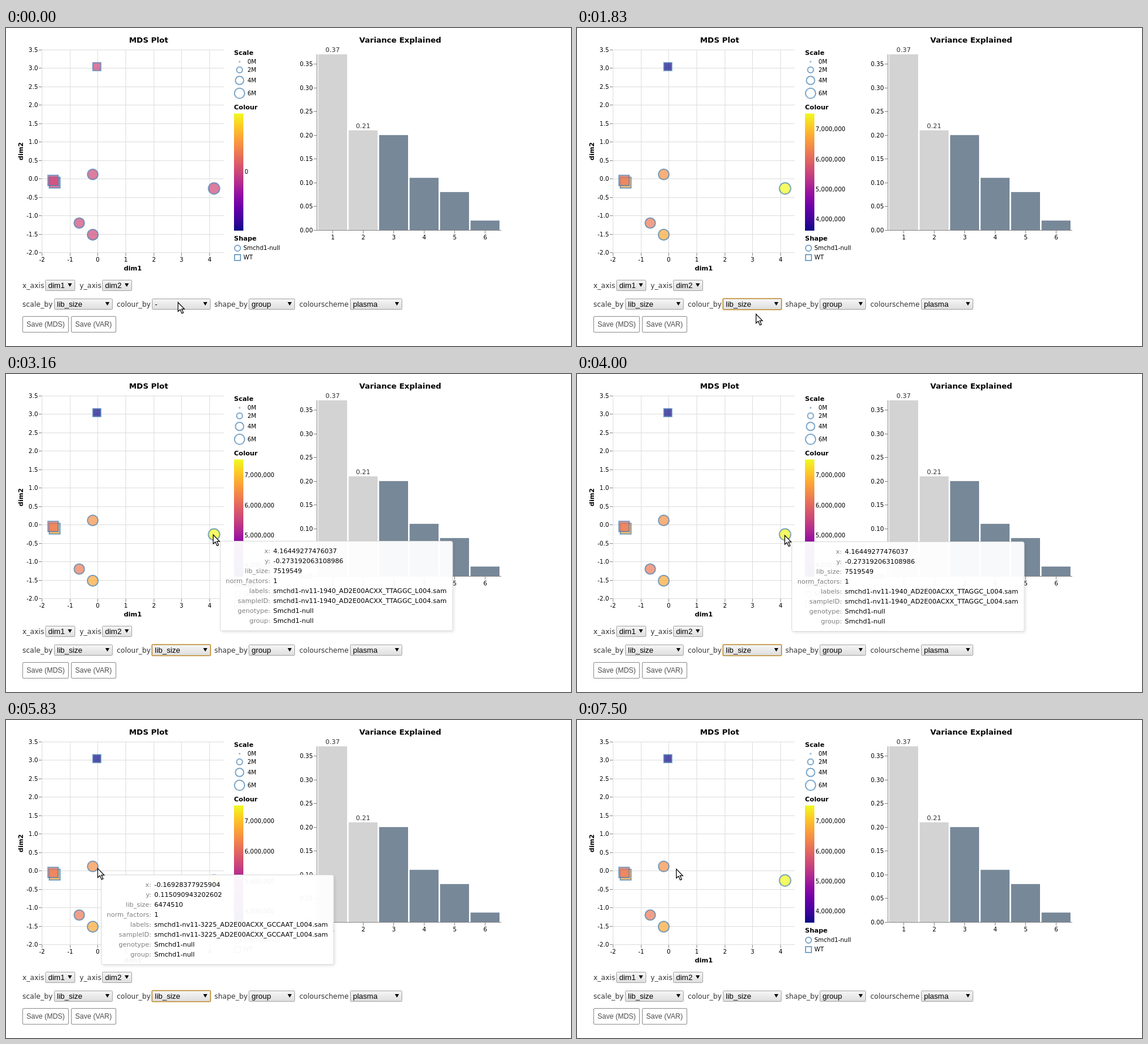
An HTML page that plays this animation: 964x543 px, repeating every 7.66 s.

```html
<!DOCTYPE html>
<html lang="en">
<head>
<meta charset="utf-8">
<title>MDS plot</title>
<style>
  html, body { margin: 0; width: 100%; height: 100%; overflow: hidden; background: #fff; }
  svg { display: block; font: 10px "DejaVu Sans", sans-serif; }
  .ui { font-family: "Liberation Sans", Arial, sans-serif; font-size: 13px; }
  .bold { font-weight: bold; font-size: 11px; }
  .title { font-weight: bold; font-size: 13px; }
  .mark { stroke: #4682b4; stroke-width: 2; stroke-opacity: .7; fill-opacity: .7; }
  .tip { font-size: 11px; }
  .mid { text-anchor: middle; }
  .end { text-anchor: end; }
</style>
</head>
<body>
<svg width="964" height="543" viewBox="0 0 964 543">
  <defs>
    <linearGradient id="ramp" x1="0" y1="1" x2="0" y2="0"></linearGradient>
    <linearGradient id="face" x1="0" y1="0" x2="0" y2="1">
      <stop stop-color="#f6f6f6"/><stop offset="1" stop-color="#dedede"/>
    </linearGradient>
    <filter id="shade" x="-10%" y="-20%" width="120%" height="140%">
      <feDropShadow dx="2" dy="2" stdDeviation="2" flood-opacity=".1"/>
    </filter>
  </defs>
  <g id="base"></g>
  <g id="live"></g>
</svg>
<script>
const $ = id => document.getElementById(id);
const LOOP = 7660;
const plasma = ['0d0887', '41049d', '6a00a8', '8f0da4', 'b12a90', 'cc4778',
  'e16462', 'f2844b', 'fca636', 'fcce25', 'f0f921'];

const text = (x, y, s, cls = '', fill = '#000') =>
  `<text x="${x}" y="${y}" class="${cls}" fill="${fill}">${s}</text>`;
const rect = (x, y, w, h, attrs) =>
  `<rect x="${x}" y="${y}" width="${w}" height="${h}" ${attrs}/>`;
const line = (x1, y1, x2, y2, color) =>
  `<path d="M${x1} ${y1}L${x2} ${y2}" stroke="${color}"/>`;
const mark = (x, y, r, square, fill = 'none') => square
  ? rect(x - r, y - r, 2 * r, 2 * r, `class="mark" fill="${fill}"`)
  : `<circle cx="${x}" cy="${y}" r="${r}" class="mark" fill="${fill}"/>`;

function plasmaAt(t) {
  const i = Math.min(9, Math.floor(t * 10)), f = t * 10 - i;
  const part = (k, c) => parseInt(plasma[k].substr(c * 2, 2), 16);
  return `rgb(${[0, 1, 2].map(c => Math.round(part(i, c) * (1 - f) + part(i + 1, c) * f))})`;
}

function scatter() {
  let s = '', labels = '';
  for (let k = 0; k < 7; k++) {
    const x = Math.round(61 + k * 310 / 6.5 - .01) + .5;
    s += line(x, 37, x, 383, '#ddd') + line(x, 383, x, 389, '#888');
    labels += text(x, 399, k - 2, 'mid');
  }
  for (let k = 0; k < 12; k++) {
    const y = Math.round(37 + k * 346 / 11) + .5;
    s += line(61, y, 371.5, y, '#ddd') + line(56, y, 61, y, '#888');
    labels += text(54.5, y + 3.5, (3.5 - k / 2).toFixed(1), 'end');
  }
  return s + labels + text(243.3, 25, 'MDS Plot', 'title mid') +
    text(216.3, 414, 'dim1', 'bold mid') +
    `<g transform="translate(29 210.5) rotate(-90)">${text(0, 0, 'dim2', 'bold mid')}</g>`;
}

function legends() {
  let s = text(389, 46, 'Scale', 'bold') + text(389, 139, 'Colour', 'bold') +
    text(389, 363, 'Shape', 'bold');
  [57.5, 71.5, 89.5, 111.5].forEach((y, i) => {
    s += mark(398.5, y, i ? 5 * Math.sqrt(i) : .5) + text(412, Math.round(y + 3.5), 2 * i + 'M');
  });
  return s + rect(389, 146, 16, 200, 'fill="url(#ramp)"') +
    mark(395, 376, 5) + text(405, 379, 'Smchd1-null') +
    mark(395, 392, 5, true) + text(405, 395, 'WT');
}

function bars() {
  const unit = 300 / .37;
  let s = text(672.7, 25, 'Variance Explained', 'title mid');
  [.37, .21, .2, .11, .08, .02].forEach((v, i) => {
    const x = 532.6 + 52 * i, h = v * unit, mid = x + 24.7;
    s += rect(x, 345 - h, 49.4, h, `fill="${i < 2 ? '#d3d3d3' : '#778899'}"`);
    if (i < 2) s += `<g font-size="11">${text(mid, Math.round(341 - h), v, 'mid', '#333')}</g>`;
    s += line(Math.round(mid) + .5, 345, Math.round(mid) + .5, 351, '#888') +
      text(mid + .3, 361, i + 1, 'mid');
  });
  for (let k = 0; k < 8; k++) {
    const y = Math.round(345 - k * .05 * unit) + .5;
    s += line(525, y, 530, y, '#888') + text(523.5, y + 3.5, (k * .05).toFixed(2), 'end');
  }
  return s + line(530.5, 45, 530.5, 346, '#888') + line(530, 345.5, 845, 345.5, '#888');
}

function select(x, y, w, value) {
  const r = x + w;
  return rect(x + .5, y + .5, w - 1, 18, 'rx="1" fill="url(#face)" stroke="#a3a3a3"') +
    text(x + 5, y + 14, value, 'ui') +
    `<path d="M${r - 12.5} ${y + 6}h7l-3.5 6z"/>`;
}

function controls() {
  let s = '';
  [[28, 444, 'x_axis'], [125.5, 444, 'y_axis'], [28, 476, 'scale_by'], [189, 476, 'colour_by'],
    [355.5, 476, 'shape_by'], [500.5, 476, 'colourscheme']].forEach(([x, y, label]) => {
    s += `<g font-size="12">${text(x, y, label, '', '#333')}</g>`;
  });
  [[28, 79, 'Save (MDS)'], [111, 77, 'Save (VAR)']].forEach(([x, w, label]) => {
    s += rect(x + .5, 492.5, w - 1, 27, 'rx="1.5" fill="#fff" stroke="#8c8c8c"') +
      `<text x="${x + 7}" y="510" class="ui" style="font-size:12px" fill="#4c4c4c">${label}</text>`;
  });
  return s + select(67, 430, 51, 'dim1') + select(164, 430, 51, 'dim2') +
    select(82, 462, 100, 'lib_size') + select(414, 462, 79, 'group') +
    select(587, 462, 89, 'plasma');
}

// x, y, position in the lib_size range, square
const points = [[155, 66, 0, 1], [83, 264, .8, 1], [80.3, 260.3, .64, 1], [148, 250, .733],
  [355, 274, 1], [125, 333, .66], [148, 353, .8]];

function dataMarks(coloured) {
  let s = points.map(([x, y, t, square]) =>
    mark(x, y, Math.sqrt(12.5 * (3.61 + 3.91 * t)), square, plasmaAt(coloured ? t : .5))).join('');
  if (!coloured) return s + text(407, 249, '0');
  for (let m = 4; m < 8; m++) s += text(407, Math.round(534.7 - 51.2 * m), m + ',000,000');
  return s;
}

function menu(active) {
  let s = rect(249.5, 481.5, 99, 51, 'fill="#fff" stroke="#c99a4a"');
  ['-', 'lib_size', 'norm_factors'].forEach((item, i) => {
    const y = 482 + Math.round(16.5 * i), on = i === active;
    if (on) s += rect(250, y, 98, 16, 'fill="#1e90ff"');
    s += text(254, y + 12, item, 'ui', on ? '#fff' : '#000');
  });
  return s;
}

function tooltip(x, y, px, py, size, sample) {
  const file = `smchd1-nv11-${sample}_L004.sam`;
  const rows = { x: px, y: py, lib_size: size, norm_factors: 1, labels: file, sampleID: file,
    genotype: 'Smchd1-null', group: 'Smchd1-null' };
  const box = rect(.5, .5, 396.5, 153, 'rx="3" fill="#fff" fill-opacity=".95" stroke="#d9d9d9" filter="url(#shade)"');
  const body = Object.entries(rows).map(([key, value], i) =>
    text(86, 21 + 17 * i, key + ':', 'tip end', '#808080') +
    text(91, 21 + 17 * i, value, 'tip')).join('');
  return `<g transform="translate(${x} ${y})">${box}${body}</g>`;
}

// tick, x, y
const path = [[0, 293, 468], [3, 293, 468], [6, 302, 500], [10, 302, 500], [17, 360, 283],
  [18, 356, 278], [19, 353, 274], [23, 353, 274], [24, 354, 275], [29, 154, 257], [30, 150, 253],
  [34, 150, 253], [35, 156, 253], [39, 169, 254], [46, 169, 254]];

function pointer(n) {
  const i = path.findIndex(p => p[0] > n), [t0, x0, y0] = path[i - 1], [t1, x1, y1] = path[i];
  const u = (n - t0) / (t1 - t0), e = u * u * (3 - 2 * u);
  return [Math.round(x0 + (x1 - x0) * e), Math.round(y0 + (y1 - y0) * e)];
}

function scene(n) {
  const [x, y] = pointer(n), coloured = n >= 9;
  let s = dataMarks(coloured) + select(249, 462, 100, coloured ? 'lib_size' : '-');
  if (n >= 2 && n < 45)
    s += rect(249, 462, 100, 19, 'rx="1.5" fill="none" stroke="#c99536" stroke-width="1.6"');
  if (n >= 2 && n < 9) s += menu(y >= 499 ? 1 : 0);
  if (n >= 18 && n <= 24)
    s += tooltip(x + 12, y + 11, '4.16449277476037', '-0.273192063108986', 7519549,
      '1940_AD2E00ACXX_TTAGGC');
  if (n >= 30 && n <= 35)
    s += tooltip(162, 264, '-0.16928377925904', '0.115090943202602', 6474510,
      '3225_AD2E00ACXX_GCCAAT');
  return s + `<path transform="translate(${x + .5} ${y + .5})" fill="#fff" stroke="#000" stroke-width="1.2"
    d="M0 0V15.5L3.7 12.2L6.6 18.8L9.2 17.6L6.3 11.3H11Z"/>`;
}

$('ramp').innerHTML = plasma.map((c, i) =>
  `<stop offset="${i / 10}" stop-color="#${c}"/>`).join('');
$('base').innerHTML = scatter() + legends() + bars() + controls();

let shown = -1;
const start = performance.now();
function draw() {
  const n = Math.floor(((performance.now() - start) % LOOP + 7) * .006);
  if (n !== shown) $('live').innerHTML = scene(Math.min(45, shown = n));
  requestAnimationFrame(draw);
}
draw();
</script>
</body>
</html>
```
